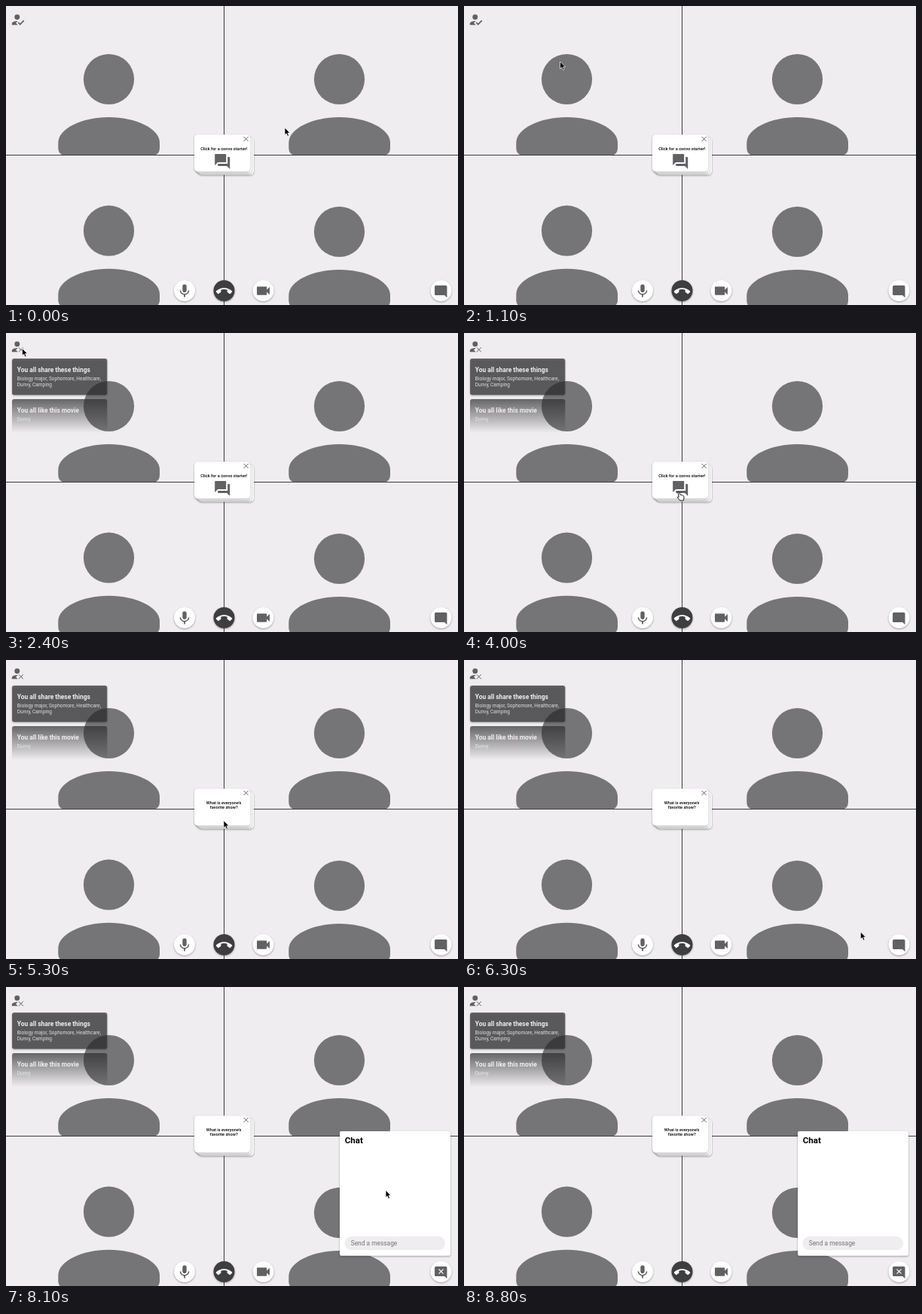
An HTML page that plays this animation: 600x398 px, repeating every 9200 ms.

```html
<!DOCTYPE html>
<html lang="en">
<head>
<meta charset="utf-8">
<title>Video call</title>
<style>
  html, body { margin: 0; width: 100%; height: 100%; overflow: hidden; background: #efedf0; }
  svg { display: block; width: 100vw; height: 100vh; font-family: Roboto, sans-serif; }
  .grey { fill: #757477; }
  .icon { fill: #616063; }
  .white { fill: #fff; }
  .raised { filter: drop-shadow(0 1px 1.2px rgba(0, 0, 0, .35)); }
  .cross { stroke: #616063; fill: none; }
  .bold { font-weight: 700; font-size: 8.4px; }
  .small { font-size: 6.5px; fill: #dedde0; }
  .prompt { font-size: 5.65px; font-weight: 500; text-anchor: middle; }
  .hidden { display: none; }
</style>
</head>
<body>
<svg viewBox="0 0 600 398">
  <defs>
    <g id="person" class="grey">
      <circle cx="136.5" cy="97.5" r="33.6"/>
      <path d="M69.3 182C69.3 163 101 148 136.5 148S204 163 204 182V189Q204 198.5 195 198.5H78.3Q69.3 198.5 69.3 189Z"/>
    </g>
    <path id="x" d="M-3-3L3 3M3-3L-3 3"/>
    <linearGradient id="fade" x2="0" y2="1">
      <stop stop-color="#fff"/>
      <stop offset="1" stop-color="#fff" stop-opacity="0"/>
    </linearGradient>
    <mask id="fadeOut"><rect x="6" y="87" width="130" height="46" fill="url(#fade)"/></mask>
  </defs>

  <rect width="600" height="398" fill="#efedf0"/>
  <use href="#person"/>
  <use href="#person" x="306"/>
  <use href="#person" y="201.7"/>
  <use href="#person" x="306" y="203"/>
  <path d="M289.5 0V398M0 198.5H600" stroke="#3c3b3e"/>

  <g class="icon" transform="translate(5.2 7.8) scale(.87)">
    <path d="M9 17l3-2.94c-.39-.04-.68-.06-1-.06-2.67 0-8 1.34-8 4v2h9zM11 12a4 4 0 1 0 0-8 4 4 0 0 0 0 8z"/>
    <path id="check" d="M15.47 20.5L12 17l1.4-1.41 2.07 2.08 5.13-5.17 1.4 1.41z"/>
  </g>

  <g id="shared">
    <use href="#x" class="cross" x="19.8" y="22.3"/>
    <rect class="raised" x="8" y="34" width="126.3" height="48.6" rx="3" fill="#2d2d2f" fill-opacity=".68"/>
    <text class="bold" x="14.8" y="52.3" fill="#efedf0">You all share these things</text>
    <text class="small" x="14.8" y="63.2">Biology major, Sophomore, Healthcare,</text>
    <text class="small" x="14.8" y="70.8">Dunvy, Camping</text>
    <g mask="url(#fadeOut)">
      <rect x="8" y="88" width="126.3" height="48" rx="3" fill="#2d2d2f" fill-opacity=".72"/>
      <text class="bold" x="14.8" y="106" fill="#efedf0">You all like this movie</text>
      <text class="small" x="14.8" y="117">Dunvy</text>
    </g>
  </g>

  <g class="white">
    <rect class="raised" x="255" y="175.5" width="74" height="49.3" rx="5"/>
    <rect class="raised" x="252.5" y="173.5" width="74" height="49.3" rx="5"/>
    <rect class="raised" x="250" y="171.3" width="74.3" height="49.3" rx="5"/>
  </g>
  <use href="#x" class="cross" x="318.6" y="177"/>
  <g id="starter">
    <text class="prompt" x="289.2" y="192">Click for a convo starter!</text>
    <path class="icon" transform="translate(275.2 195)" d="M21 6h-2v9H6v2c0 .55.45 1 1 1h11l4 4V7c0-.55-.45-1-1-1zm-4 6V3c0-.55-.45-1-1-1H3c-.55 0-1 .45-1 1v14l4-4h10c.55 0 1-.45 1-1z"/>
  </g>
  <g id="question" class="prompt">
    <text x="289.2" y="192">What is everyone's</text>
    <text x="289.2" y="198.4">favorite show?</text>
  </g>

  <g class="white">
    <circle class="raised" cx="237" cy="379" r="14"/>
    <circle class="raised" cx="289.5" cy="379" r="14" fill="#3e3d40"/>
    <circle class="raised" cx="341.5" cy="379" r="14"/>
    <circle class="raised" cx="577.5" cy="379" r="14"/>
  </g>
  <g class="icon">
    <path transform="translate(226.2 368.6) scale(.9)" d="M12 14c1.66 0 3-1.34 3-3V5a3 3 0 0 0-6 0v6c0 1.66 1.34 3 3 3zM17.3 11c0 3-2.54 5.1-5.3 5.1S6.7 14 6.7 11H5c0 3.41 2.72 6.23 6 6.72V21h2v-3.28c3.28-.48 6-3.3 6-6.72z"/>
    <path class="white" transform="translate(278.7 369) scale(.9)" d="M12 9c-1.6 0-3.15.25-4.6.72v3.1c0 .39-.23.74-.56.9-.98.49-1.87 1.12-2.66 1.85-.4.37-1 .37-1.41-.01L.29 13.08c-.39-.4-.39-1 0-1.41C3.34 8.78 7.46 7 12 7s8.66 1.78 11.71 4.67c.39.4.39 1 0 1.42l-2.48 2.48c-.4.39-1 .39-1.41.01-.79-.74-1.69-1.36-2.67-1.85-.33-.16-.56-.5-.56-.9v-3.1C15.15 9.25 13.6 9 12 9z"/>
    <path transform="translate(330.2 367.8) scale(.94)" d="M17 10.5V7c0-.55-.45-1-1-1H4c-.55 0-1 .45-1 1v10c0 .55.45 1 1 1h12c.55 0 1-.45 1-1v-3.5l4 4v-11l-4 4z"/>
    <path transform="translate(567.4 370.3) scale(.82)" d="M22 4c0-1.1-.9-2-2-2H4c-1.1 0-2 .9-2 2v12c0 1.1.9 2 2 2h14l4 4z"/>
  </g>

  <g id="chat">
    <use href="#x" x="577.5" y="378.6" stroke="#fff" stroke-width="1.2"/>
    <rect class="white raised" x="443" y="192" width="147" height="165.8" rx="2"/>
    <text x="449.8" y="208" font-size="11.5" font-weight="700">Chat</text>
    <rect x="449.5" y="332" width="133.5" height="18.3" rx="9.1" fill="#efedf0"/>
    <text class="grey" x="457.7" y="344.4" font-size="8.4">Send a message</text>
  </g>

  <g id="cursor" stroke-linejoin="round">
    <path id="arrow" d="M0 0V9.6L2.2 7.6 3.8 11.2 5.5 10.4 4 7H7Z" stroke="#fff" stroke-width=".7"/>
    <path id="hand" d="M-1 .7Q0-.6 1 .7L2 4Q3 3.2 3.7 4.2 4.8 3.6 5.3 4.8 6.6 4.6 6.8 6L7 8.7 6.2 11.3H1.8L-1.6 7.4Q-1.7 6 .2 6.6Z" fill="#fff" stroke="#000" stroke-width=".9"/>
  </g>
</svg>
<script>
  const LOOP = 9200, STEP = 100;
  const easeIn = p => p ** 3;
  const easeOut = p => 1 - (1 - p) ** 5;
  const easeBoth = p => p * p * (3 - 2 * p);

  // start time, steps, end x, end y, easing
  const moves = [
    [800, 4, 127.5, 74, easeBoth],
    [1400, 6, 21.5, 20.5, easeBoth],
    [2900, 4, 129.5, 30.5, easeBoth],
    [3400, 3, 192, 169.5, easeBoth],
    [3900, 4, 288, 213, easeOut],
    [5300, 5, 407.5, 317.5, easeIn],
    [6000, 6, 568, 377.5, easeBoth],
    [7800, 1, 564, 381, easeBoth],
    [7900, 8, 374.5, 32, easeBoth]
  ];
  const hovers = [[1800, 2400], [4000, 4400], [6400, 7100]];

  const $ = id => document.getElementById(id);
  const show = (id, on) => $(id).classList.toggle("hidden", !on);

  function cursorAt(t) {
    let x = 370, y = 162;
    for (const [start, steps, endX, endY, ease] of moves) {
      if (t < start) break;
      const p = ease(Math.min(1, (Math.floor((t - start) / STEP) + 1) / steps));
      x += (endX - x) * p;
      y += (endY - y) * p;
    }
    return [x, y];
  }

  function draw(now) {
    const t = now % LOOP;
    const hovering = hovers.some(([from, to]) => t >= from && t < to);
    show("check", t < 2400);
    show("shared", t >= 2400);
    show("starter", t < 4400);
    show("question", t >= 4400);
    show("chat", t >= 7100);
    show("cursor", t < 8800);
    show("arrow", !hovering);
    show("hand", hovering);
    $("cursor").setAttribute("transform", `translate(${cursorAt(t)})`);
  }

  const begin = performance.now();
  function frame() {
    draw(performance.now() - begin);
    requestAnimationFrame(frame);
  }
  frame();
</script>
</body>
</html>
```
